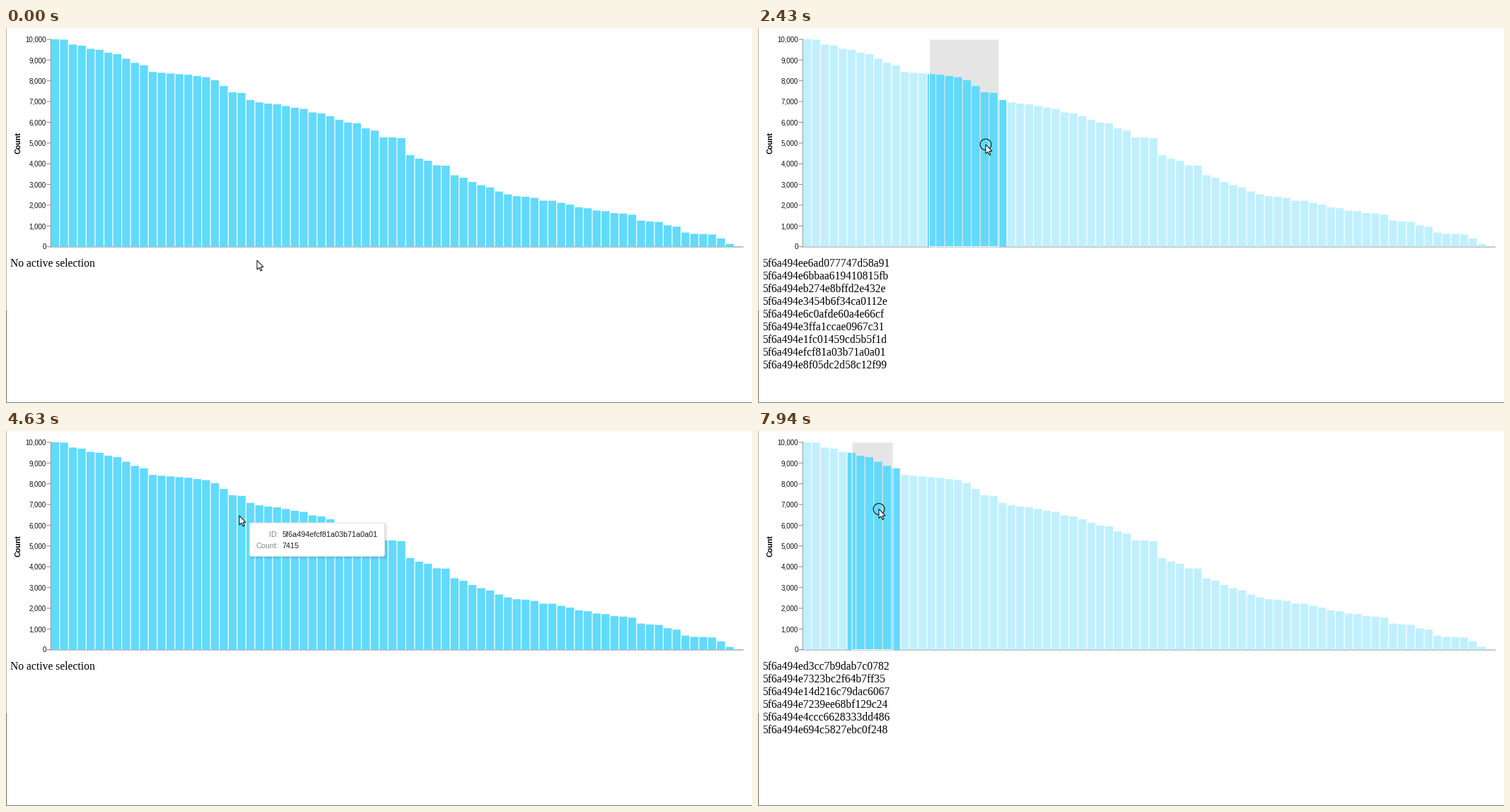
These frames come from a looping animation (1055x531 px, 8000 ms). A matplotlib script:

```python
import random

import matplotlib.pyplot as plt
import numpy as np
from matplotlib.animation import FuncAnimation
from matplotlib.collections import PolyCollection
from matplotlib.patches import Circle, FancyBboxPatch, Polygon, Rectangle

W, H, DPI = 1055, 531, 100
PT = 72 / DPI                      # points per pixel
LOOP, INTERVAL = 8000, 20
X0, PITCH, BAR_W = 63.8, 12.555, 11.3
TOP, BASE = 16, 309.7
BLUE, DIM, GREY = "#61dafb", "#c0f0fd", "#888888"

COUNTS = [
    10000, 9985, 9745, 9695, 9540, 9495, 9355, 9285, 9065, 8865, 8745, 8425, 8385,
    8355, 8320, 8290, 8230, 8175, 8030, 7750, 7445, 7415, 7075, 6960, 6900, 6865,
    6785, 6700, 6645, 6475, 6425, 6290, 6120, 5985, 5950, 5705, 5600, 5270, 5268,
    5235, 4420, 4245, 4145, 3925, 3910, 3445, 3325, 3120, 2965, 2860, 2660, 2520,
    2435, 2410, 2355, 2220, 2218, 2115, 2030, 1900, 1855, 1745, 1715, 1620, 1595,
    1545, 1260, 1215, 1195, 1035, 968, 680, 620, 612, 590, 400, 135, 15]

# Ids of bars 5 to 22; the rest are generated.
KNOWN_IDS = """d3cc7b9dab7c0782 7323bc2f64b7ff35 14d216c79dac6067 7239ee68bf129c24
4ccc6628333dd486 694c5827ebc0f248 8801f05b0095216b 56323ceab1de3a99 2ecbdc0acaefec2b
e6ad077747d58a91 6bbaa619410815fb b274e8bffd2e432e 3454b6f34ca0112e 6c0afde60a4e66cf
3ffa1ccae0967c31 1fc01459cd5b5f1d fcf81a03b71a0a01 8f05dc2d58c12f99""".split()
rng = random.Random(4)
IDS = ["5f6a494e" + "".join(rng.choices("0123456789abcdef", k=16)) for _ in COUNTS]
IDS[5:23] = ["5f6a494e" + tail for tail in KNOWN_IDS]

# start ms, pointer, button down, brush extent, hovered point
STEPS = [
    (0, (355, 329), 0, None, None),
    (280, (333, 293), 0, None, (342, 309)),
    (430, (262, 212), 0, None, (267, 218)),
    (550, (206, 145), 0, None, (206, 145)),
    (830, (206.5, 145.5), 1, None, (206, 145)),
    (980, (251, 144), 1, (204.5, 250), (251, 144)),
    (1100, (293, 143), 1, (204.5, 292), (293, 143)),
    (1250, (304, 142), 1, (204.5, 303.5), (304, 142)),
    (1400, (307.5, 142), 1, (204.5, 306.5), (307, 142)),
    (1650, (304, 148), 1, (204.5, 303.5), None),
    (1770, (295, 157), 0, (204.5, 303.5), None),
    (1890, (286, 164), 0, (204.5, 303.5), None),
    (2010, (284, 165), 1, (205, 304), None),
    (2160, (292, 165), 1, (212, 311), None),
    (2280, (305, 165), 1, (225, 324), None),
    (2430, (322, 165), 1, (242.5, 341), None),
    (2550, (371, 166), 1, (293, 391.5), None),
    (2670, (432, 168), 1, (354, 452.5), None),
    (2790, (492, 171), 1, (414, 512.5), None),
    (2910, (535, 173), 1, (457.5, 556), None),
    (3060, (545, 174.5), 1, (468.5, 567), None),
    (3320, (545, 174.5), 0, (468.5, 567), None),
    (3580, (649, 166), 0, (468.5, 567), None),
    (3730, (675.5, 162.5), 1, None, None),
    (3870, (675.5, 162.5), 0, None, None),
    (4270, (622, 163), 0, None, None),
    (4390, (532, 164), 0, None, (532, 164)),
    (4510, (430, 150), 0, None, (434, 151)),
    (4630, (330, 120), 0, None, (335, 122)),
    (4750, (230, 85), 0, None, (236, 88)),
    (4870, (148, 54), 0, None, (154, 57)),
    (4990, (89, 33), 0, None, (97, 41)),
    (5140, (96, 15), 0, None, None),
    (5260, (109, 9), 0, None, None),
    (5380, (121, 15), 0, None, None),
    (5530, (85.5, 17.5), 1, None, None),
    (5680, (76, 22), 0, None, (76, 22)),
    (5800, (62, 20), 0, None, None),
    (5950, (72, 22), 0, None, (72, 23)),
    (6070, (90, 25), 0, None, (90, 25)),
    (6190, (89, 14), 0, None, None),
    (6310, (86, 9), 0, None, None),
    (6460, (112, 15), 0, None, None),
    (6580, (132.5, 25), 0, None, None),
    (6730, (133.5, 26.5), 1, None, None),
    (6880, (134, 32), 1, None, (133.5, 32)),
    (7000, (134.3, 36), 1, None, (133.5, 34)),
    (7120, (153, 47), 1, (133, 151), (153, 47)),
    (7240, (178, 58), 1, (133, 176), (178, 58)),
    (7360, (193.5, 63.5), 1, (133, 191), (195, 67)),
    (7670, (193, 66), 0, (133, 191), (195, 65)),
    (7820, (181, 90), 0, (133, 191), None),
    (7940, (171, 110.5), 1, (133, 191), None),
]
STARTS = [step[0] for step in STEPS]
ARROW = np.array([(0, 0), (0, 13), (3, 10.3), (5.2, 15), (7, 14.2), (5, 9.6), (9, 9.4)])


def y_of(count):
    return BASE - (BASE - TOP) * count / 10000


def x_of(bar):
    return X0 + PITCH * bar


plt.rcParams["path.snap"] = False
fig = plt.figure(figsize=(W / DPI, H / DPI), dpi=DPI, facecolor="#fefefe")
ax = fig.add_axes([0, 0, 1, 1])
ax.set(xlim=(0, W), ylim=(H, 0))
ax.axis("off")


def label(x, y, text="", size=9.8, font="Liberation Sans", **kw):
    return ax.text(x, y, text, fontsize=size * PT, family=font, **kw)


def rect(x, y, w, h, color, **kw):
    return ax.add_patch(Rectangle((x, y), w, h, fc=color, ec="none", **kw))


def rounded(color, edge="none", **kw):
    style = "round,pad=0,rounding_size=3"
    return ax.add_patch(FancyBboxPatch((0, 0), 1, 1, boxstyle=style, fc=color, ec=edge,
                                       lw=PT, mutation_aspect=1, **kw))


# Window edges
rect(0, 0, 1, 400, "#b4b4b4")
rect(0, 400, 1, 131, "#6a6a6a")
rect(0, 530, W, 1, "#7c7c7c")

# Axes
for value in range(0, 10001, 1000):
    y = y_of(value)
    ax.plot([58, 63], [y, y], color=GREY, lw=PT, zorder=1)
    label(56.8, y + 3.7, f"{value:,}", ha="right", color="#111111")
ax.plot([63.3, 63.3], [TOP, BASE], color=GREY, lw=PT, zorder=1)
ax.plot([63, 1042.4], [310, 310], color=GREY, lw=PT, zorder=1)
label(17.3, 163, "Count", 10.8, weight="bold", rotation=90, ha="center", va="center")

# Bars and brush
brush_fill = rect(0, TOP, 1, BASE - TOP, "#e5e5e5", zorder=2)
bars = PolyCollection(
    [[(x, BASE), (x, y), (x + BAR_W, y), (x + BAR_W, BASE)]
     for x, y in ((x_of(i), y_of(c)) for i, c in enumerate(COUNTS))],
    edgecolors="none", zorder=3)
ax.add_collection(bars, autolim=False)
brush_edge = ax.add_patch(Rectangle((0, TOP), 1, BASE - TOP, fc="none", ec="white",
                                    lw=PT, zorder=4))
lines = [label(6, 338 + 18 * i, size=15.65, font="Liberation Serif") for i in range(10)]

# Tooltip
shadows = [rounded("black", alpha=0.035, zorder=5) for _ in range(3)]
box = rounded("white", "#dedede", zorder=6)
keys = [label(0, 0, text, 10.8, color=GREY, ha="right", zorder=7)
        for text in ("ID:", "Count:")]
values = [label(0, 0, "", 10.8, color="#1c1c1c", zorder=7) for _ in keys]
tooltip = [*shadows, box, *keys, *values]

# Pointer
ring = ax.add_patch(Circle((0, 0), 7.9, fc="none", ec="black", lw=PT, zorder=8))
arrow = ax.add_patch(Polygon(ARROW, closed=True, fc="white", ec="black",
                             lw=0.95 * PT, zorder=9))


def show_brush(extent):
    for patch in (brush_fill, brush_edge):
        patch.set_visible(extent is not None)
        if extent:
            patch.set_x(extent[0])
            patch.set_width(extent[1] - extent[0])
    if extent:
        chosen = [i for i in range(len(COUNTS))
                  if x_of(i) <= extent[1] and x_of(i) + BAR_W >= extent[0]]
        texts = [IDS[i] for i in chosen]
        bars.set_facecolor([BLUE if i in chosen else DIM for i in range(len(COUNTS))])
    else:
        texts = ["No active selection"]
        bars.set_facecolor(BLUE)
    for i, line in enumerate(lines):
        line.set_text(texts[i] if i < len(texts) else "")


def show_tooltip(point):
    for artist in tooltip:
        artist.set_visible(point is not None)
    if point is None:
        return
    left, top = point[0] + 9.5, point[1] + 8
    bar = int((point[0] - X0) / PITCH)
    for row, text in enumerate((IDS[bar], str(COUNTS[bar]))):
        baseline = top + 19.7 + 16 * row
        keys[row].set_position((left + 41.5, baseline))
        values[row].set_position((left + 46.2, baseline))
        values[row].set_text(text)
    width = values[0].get_window_extent().width + 56
    box.set_bounds(left, top, width, 47.5)
    for grow, shadow in enumerate(shadows):
        shadow.set_bounds(left + 2 - grow, top + 2 - grow,
                          width + 2 * grow, 47.5 + 2 * grow)


def update(frame):
    now = frame * INTERVAL + INTERVAL / 2
    _, pointer, pressed, extent, hover = STEPS[np.searchsorted(STARTS, now, "right") - 1]
    show_brush(extent)
    show_tooltip(hover)
    ring.set_visible(bool(pressed))
    ring.center = pointer
    arrow.set_xy(ARROW + pointer)
    return []


anim = FuncAnimation(fig, update, frames=LOOP // INTERVAL, interval=INTERVAL,
                     repeat=True, repeat_delay=0)
plt.show()
```
